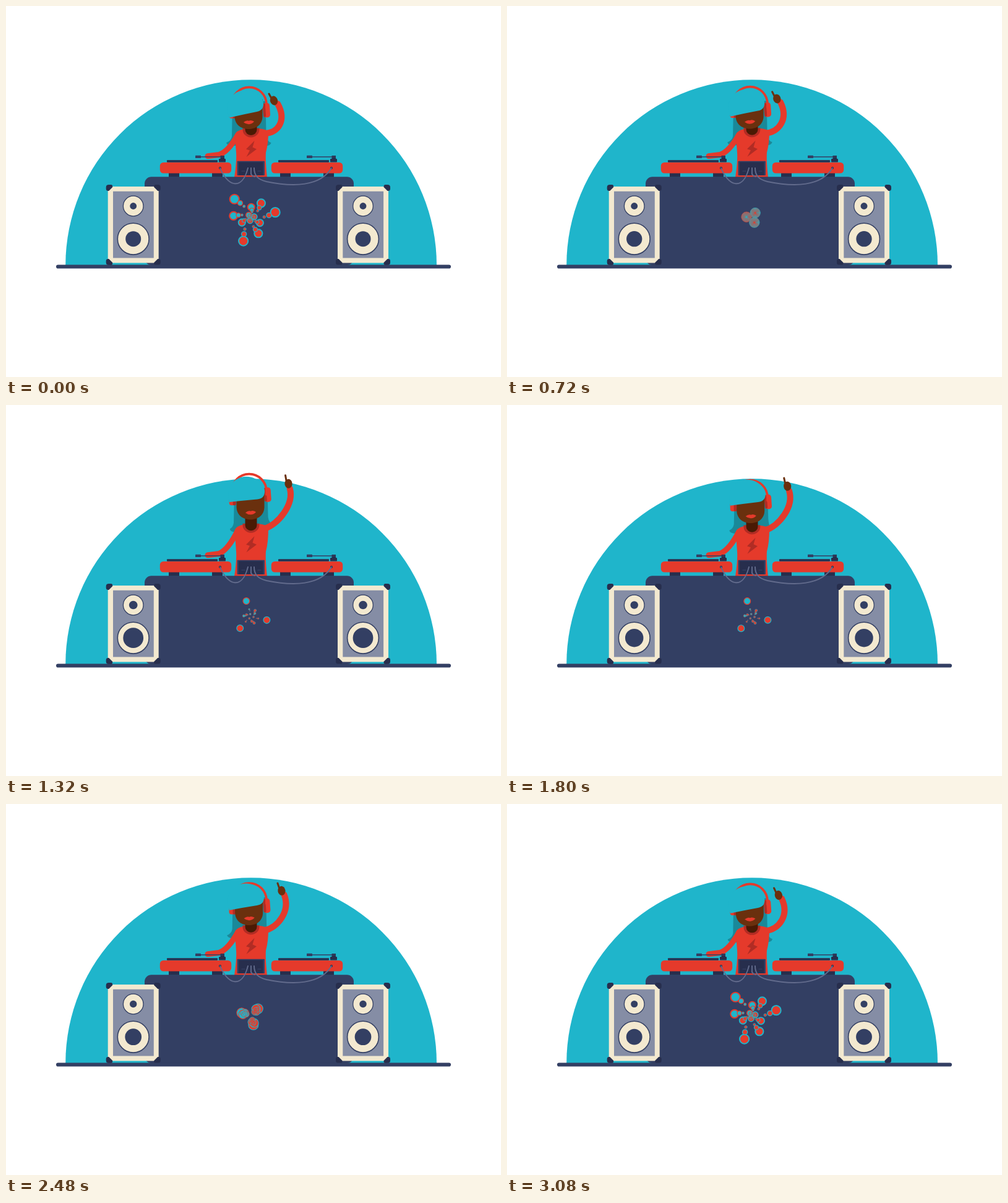
Write an HTML page with a canvas that moves like this. It is 800 px wide and 600 px high and loops after 3120 ms.

```html
<!DOCTYPE html>
<html>
<head>
<meta charset="utf-8">
<title>DJ</title>
<style>
html, body { margin: 0; width: 100%; height: 100%; overflow: hidden; background: #fff; }
canvas { display: block; }
</style>
</head>
<body>
<canvas id="stage" width="800" height="600"></canvas>
<script>
const g = document.getElementById('stage').getContext('2d');
const LOOP = 3120, STEP = 40;
const TEAL = '#1fb5cb', HAIR = '#1a8999', NAVY = '#333f63', DARK = '#272e4d',
  RED = '#e53a2b', DEEP = '#b12c24', SKIN = '#6a300e', NECK = '#4a1a04',
  CREAM = '#f3e9d0', GREY = '#858da5', CABLE = '#626b8c';

const mix = (a, b, k) => a + (b - a) * k;

// ---- Bounce: one skewed sine per part, from low pose (0) to high pose (1) ----
const BEATS = [0, 740, 1560, 2340, LOOP];

function swing(p, skew, power) {
  return Math.pow(Math.max(0, Math.sin(Math.PI * Math.pow(p, skew))), power);
}

function poseAt(t) {
  const i = BEATS.findLastIndex(b => b <= t);
  const p = (t - BEATS[i]) / (BEATS[i + 1] - BEATS[i]);
  const lift = swing(p, 1.3, 1.5);
  const reach = swing(p, 1.15, 1);
  const brim = swing(p, 1.2, 1.2);
  const tip = swing(p, 1.08, 1.5);
  return {
    lift, reach,
    x: 392 + 3.5 * lift,
    chin: 199 - 16 * lift,
    shift: -6.7 * lift,
    hand: 153 - 30 * reach,
    band: 159.3 - 22.3 * swing(p, 1.35, 1.6),
    brimL: 180.5 - 27.5 * brim,
    brimR: 170.5 - 21 * brim,
    tipL: 221 - 27 * tip,
    tipR: 221 - 37 * tip,
    tipX: 428.5 + 5.5 * tip - 8 * Math.max(0, Math.sin(2 * Math.PI * p))
  };
}

// ---- Bubbles: key moments of a burst that plays forwards, then back ----
const MOMENTS = [0, 320, 720, 880, 1300];

function keyed(u, values) {
  const i = Math.min(MOMENTS.findLastIndex(m => m <= u), MOMENTS.length - 2);
  const k = Math.min(1, (u - MOMENTS[i]) / (MOMENTS[i + 1] - MOMENTS[i]));
  return mix(values[i], values[i + 1], k * k * (3 - 2 * k));
}

// Four chains of three links, each repeated around the centre three times.
function bubbles(t) {
  const u = t <= 1540 ? t : Math.max(0, 3080 - t);
  const open = keyed(u, [1, 1, 0, 0.52, 0.55]);
  const twist = keyed(u, [-132, -125, -175, -164, -107]);
  const fan = keyed(u, [-43, -40, 0, 28, -69]);
  const grow = keyed(u, [1, 1, 1, 0.76, 0.7]);
  const inner = keyed(u, [1, 1, 1, 0.75, 0.45]);
  const list = [];
  for (let chain = 0; chain < 4; chain++) for (let link = 0; link < 3; link++) {
    const lead = chain + link === 0;
    const far = 40 * (1 - 0.29 * chain) * Math.pow(0.73, link);
    list.push({
      r: mix(9, far, open) * (lead ? 1 : Math.min(1, inner * 1.33)),
      angle: twist + fan * 1.15 * Math.sin(2.1 * chain) + 5 * link * open,
      size: 8.6 * grow * (1 - 0.12 * chain) * Math.pow(0.55, link) * (lead ? 1 : inner)
    });
  }
  list.sort((a, b) => b.size - a.size);
  for (const { r, angle, size } of list) for (let arm = 0; arm < 3; arm++) {
    const a = (angle + arm * 120) * Math.PI / 180;
    const edge = Math.min(2, size * 0.28) * mix(0.4, 1, open);
    disc(396 + r * Math.cos(a), 342 + r * Math.sin(a), size - edge / 2,
      arm ? RED : TEAL, arm ? TEAL : RED, edge);
  }
}

// ---- Drawing helpers ----
function fill(path, color) {
  g.fillStyle = color;
  g.fill(new Path2D(path));
}

function line(path, color, width) {
  g.strokeStyle = color;
  g.lineWidth = width;
  g.stroke(new Path2D(path));
}

function box(x, y, w, h, color, r = 0) {
  g.fillStyle = color;
  g.beginPath();
  g.roundRect(x, y, w, h, r);
  g.fill();
}

function disc(x, y, r, color, edge, width) {
  g.beginPath();
  g.arc(x, y, Math.max(0, r), 0, Math.PI * 2);
  g.fillStyle = color;
  g.fill();
  if (edge) {
    g.strokeStyle = edge;
    g.lineWidth = width;
    g.stroke();
  }
}

function at(x, y, angle, draw) {
  g.save();
  g.translate(x, y);
  g.rotate(angle);
  draw();
  g.restore();
}

// ---- Scene ----
function speaker(x, lift) {
  at(x, 0, 0, () => {
    box(-41, 292, 82, 123.5, CREAM);
    box(-32.7, 299.8, 65.8, 107.7, GREY);
    disc(0, 323.5, 16.3, CREAM, NAVY, 1.3);
    disc(0, 323.5, 5.4 + 1.7 * lift, NAVY);
    disc(0, 376.7, 25.4, CREAM, NAVY, 1.6);
    disc(0, 376.7, 12.5 + 4.5 * lift, NAVY);
    for (const sx of [-1, 1]) for (const sy of [-1, 1]) {
      g.save();
      g.translate(0, 354);
      g.scale(sx, sy);
      fill('M44 61Q44 65 39.5 65H36Q33.5 65 33.5 62V61L39.5 55H41.5Q44 55.5 44 58Z', DARK);
      g.restore();
    }
  });
}

function turntable(x) {
  at(x, 0, 0, () => {
    box(14, 269, 17, 7.5, DARK);
    box(84, 269, 17, 7.5, DARK);
    box(-0.2, 252.9, 115.4, 17.6, RED, 5.5);
    box(11, 249.3, 82, 3.4, DARK, 1);
    box(95, 247, 11, 5.5, DARK, 1);
    box(97.5, 242, 6.5, 6, DARK);
    box(57, 241.7, 9, 4.4, NAVY, 0.5);
    box(64, 243.2, 40, 1.6, NAVY);
    disc(97, 262, 2, DARK);
  });
}

function hair(p) {
  const l = p.x - 27, r = p.x + 28.5;
  const lx = 356 + 6.7 * p.lift, ly = p.tipL, rx = p.tipX, ry = p.tipR;
  fill(`M${l + 1} ${p.chin - 45}L${l} ${ly - 10}Q${l - 1} ${ly - 3} ${lx} ${ly}
    Q${lx + 1} ${ly + 6} ${l + 6} ${ly + 5}L400 ${ly + 4}L${r - 8} ${ry + 5}
    Q${rx - 1} ${ry + 7} ${rx} ${ry}Q${r + 1} ${ry - 2} ${r} ${ry - 12}
    L${r - 1} ${p.chin - 45}Z`, HAIR);
}

function raisedArm(p) {
  const q = p.reach;
  const hx = 433 + 27 * Math.pow(q, 0.9), hy = p.hand;
  line(`M417 ${206 + p.shift}C440 ${mix(206, 192, q)} ${mix(454, 468, q)} ${mix(185, 156, q)}
    ${hx + mix(6, 1.5, q)} ${hy + mix(5, 8, q)}`, RED, 10);
  line(`M${hx - 3} ${hy - 2}L${hx - mix(8, 4.5, q)} ${hy - mix(11, 14, q)}`, SKIN, 3);
  g.beginPath();
  g.ellipse(hx, hy, 6.1, 7.5, mix(-0.3, 0, q), 0, Math.PI * 2);
  g.fillStyle = SKIN;
  g.fill();
}

function torso(p) {
  const s = p.shift;
  line(`M375 ${208 + s}Q359 ${236 + s * 0.3} 344 240.5L326 242.7`, RED, 9);
  fill(`M384 ${199 + s}L408 ${198 + s}Q421 ${199 + s} 424 ${204 + s}
    Q424 222 420 237Q419 250 422 277H369Q373 250 372 237Q371 222 369.5 ${209 + s}
    Q372 ${201 + s} 384 ${199 + s}Z`, RED);
  at(0, s, 0, () => {
    fill('M382.5 197.5V200A13.4 12.5 0 0 0 409.3 200V197.5Z', DEEP);
    fill('M401.5 218L388 231.5L394 233.5L388.5 244L405 231.5L398.5 228.5Z', DEEP);
  });
  fill(`M386.5 ${p.chin - 12}V${200 + s}A9.5 9 0 0 0 405.5 ${200 + s}V${p.chin - 12}Z`, NECK);
}

function head(p) {
  const x = p.x, c = p.chin, b = p.band;
  box(360.5 + 0.3 * p.lift, b + 1, 10.5, 21.5, RED, 4);
  box(366.5 + 0.3 * p.lift, b + 1, 5, 21.5, DEEP, 2);
  at(421 + 2 * p.lift, b + 9 - 4.5 * p.lift, -0.07, () => {
    box(-5.5, -11.5, 11, 23.5, RED, 4.5);
    box(-5.5, -11, 4, 22, DEEP, 2);
  });
  fill(`M${x - 22.5} ${c - 48}V${c - 20}C${x - 22} ${c - 6} ${x - 11} ${c} ${x} ${c}
    S${x + 22} ${c - 6} ${x + 22.5} ${c - 20}V${c - 48}Z`, SKIN);
  at(x + 0.6, c - 11.3, -0.04, () =>
    fill('M-8.8 0Q-3.5 -3.8 0 -2Q3.5 -3.8 8.5 -.5Q4.5 3.7 0 3.5Q-5 3.5 -8.8 0Z', RED));
  line(`M365 ${b}A28 28 0 0 1 421 ${b}V${b + 5}`, RED, 3.7);
  const tilt = Math.atan2(p.brimR - p.brimL, 49) + 0.1;
  at(361, p.brimL, tilt, () =>
    fill('M0 0C-4 -14 -1 -29 10 -36C20 -43 32 -43 42 -38C52 -32 57 -25 57 -18Q57 -6 45 -5Q24 -3 0 0Z', TEAL));
}

function mixer() {
  box(373.5, 250.7, 44.5, 23.3, NAVY, 1);
  box(376, 252.5, 39.5, 21, DARK);
  line('M381 267H386M407 267H412', '#3b4468', 1.2);
}

function cables() {
  line('M346 262C357 290 381 301 391 262', CABLE, 1.9);
  line('M396 262V272M401 262C401 276 409 281 421 284C464 293 508 292 526 262', CABLE, 1.9);
  line('M396 271Q397 275 402 276', CABLE, 1.7);
}

function draw(t) {
  const p = poseAt(t);
  g.lineCap = 'round';
  g.lineJoin = 'round';
  g.fillStyle = '#fff';
  g.fillRect(0, 0, 800, 600);
  fill('M96.2 419.2A299.9 299.9 0 0 1 696 419.2Z', TEAL);
  hair(p);
  raisedArm(p);
  torso(p);
  head(p);
  box(224, 276.3, 338, 142.7, NAVY, 11);
  mixer();
  turntable(249);
  turntable(429);
  cables();
  bubbles(t);
  speaker(205.7, p.lift);
  speaker(577, p.lift);
  box(81, 418.4, 638, 6.2, NAVY, 3.1);
}

let start = null;
function tick(now) {
  if (start === null) start = now;
  const t = (now - start) % LOOP;
  draw(Math.floor(t / STEP) * STEP);
  requestAnimationFrame(tick);
}
draw(0);
requestAnimationFrame(tick);
</script>
</body>
</html>
```
